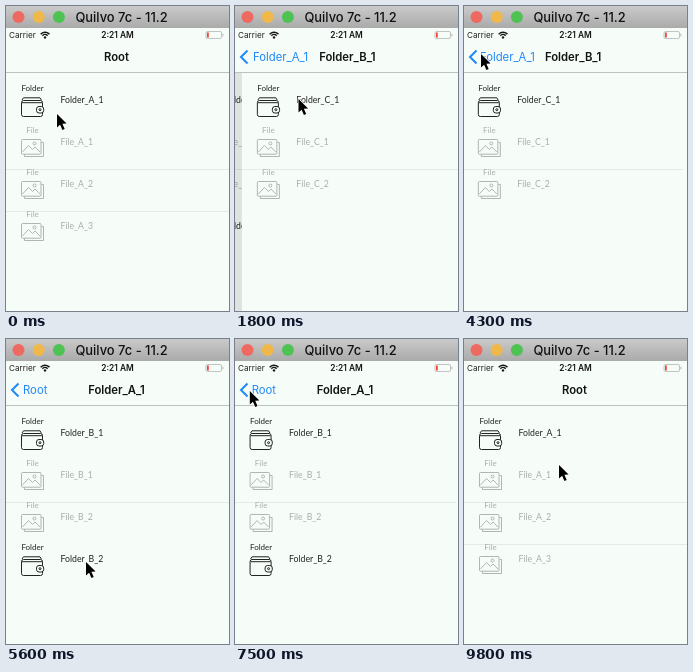
Write an HTML page with a canvas that moves like this. It is 223 px wide and 305 px high and loops after 9.9 s.

```html
<!DOCTYPE html>
<html lang="en">
<head>
<meta charset="utf-8">
<title>Folder navigation</title>
<style>
html, body { margin: 0; width: 100%; height: 100%; overflow: hidden; background: #f6fcf7; }
canvas { display: block; }
</style>
</head>
<body>
<canvas id="stage" width="223" height="305"></canvas>
<script>
const W = 223, H = 305, LOOP = 9900, NAV_BOTTOM = 67, CENTER = 110.5, PARALLAX = 67;
const BG = '#f6fcf7', BLUE = '#2089f7', DARK = '#202322', PALE = '#a9aeaa';
const UI = 'Inter, "Liberation Sans", sans-serif';
const LIST = 'Lato, "Open Sans", sans-serif';
const canvas = document.getElementById('stage');
const ctx = canvas.getContext('2d');
const scale = Math.max(1, window.devicePixelRatio || 1);
canvas.width = W * scale;
canvas.height = H * scale;
canvas.style.width = W + 'px';
canvas.style.height = H + 'px';

const pages = {
  root: { title: 'Root', rows: ['Folder_A_1', 'File_A_1', 'File_A_2', 'File_A_3'], lines: [163, 205] },
  a1: { title: 'Folder_A_1', back: 'Root', rows: ['Folder_B_1', 'File_B_1', 'File_B_2', 'Folder_B_2'], lines: [163] },
  b1: { title: 'Folder_B_1', back: 'Folder_A_1', rows: ['Folder_C_1', 'File_C_1', 'File_C_2'], lines: [163] },
  b2: { title: 'Folder_B_2', back: 'Folder_A_1', rows: [], lines: [] },
  c1: { title: 'Folder_C_1', back: 'Folder_B_1', rows: [], lines: [] }
};

// Each step: start time, lower page, upper page, pushed or popped
const steps = [
  [430, 'root', 'a1', true],
  [1445, 'a1', 'b1', true],
  [2930, 'b1', 'c1', true],
  [3900, 'b1', 'c1', false],
  [4720, 'a1', 'b1', false],
  [5930, 'a1', 'b2', true],
  [7020, 'a1', 'b2', false],
  [7900, 'root', 'a1', false]
];

// Pointer keys: time, x, y
const pointerKeys = [
  [0, 51, 108], [50, 51, 108], [200, 43, 99], [850, 43, 99], [1200, 63.5, 93],
  [2050, 63.5, 93], [2400, 12, 49], [2450, 12, 49], [2800, 76, 97],
  [3300, 76, 97], [3700, 17, 48], [5150, 17, 48], [5580, 80, 223],
  [6350, 80, 223], [6780, 16, 52], [7350, 16, 52], [7700, 13, 52],
  [8450, 13, 52], [8900, 44, 70], [9350, 72, 225], [9800, 95, 126], [LOOP, 95, 126]
];

function text(str, x, y, size, family, color, align = 'left', weight = 400) {
  ctx.font = `${weight} ${size}px ${family}`;
  ctx.fillStyle = color;
  ctx.textAlign = align;
  ctx.textBaseline = 'alphabetic';
  ctx.fillText(str, x, y);
}

function path(points, close) {
  ctx.beginPath();
  points.forEach(([x, y], i) => i ? ctx.lineTo(x, y) : ctx.moveTo(x, y));
  if (close) ctx.closePath();
}

function circle(x, y, r) {
  ctx.beginPath();
  ctx.arc(x, y, r, 0, Math.PI * 2);
}

function box(x, y, w, h, r) {
  ctx.beginPath();
  ctx.roundRect(x, y, w, h, r);
}

function at(x, y, draw) {
  ctx.save();
  ctx.translate(x, y);
  draw();
  ctx.restore();
}

function wallet() {
  ctx.strokeStyle = DARK;
  ctx.lineWidth = 1;
  box(0.5, 3.5, 21, 16, 2);
  ctx.stroke();
  path([[1, 3], [2.5, 0.8], [19, 0.8], [20.3, 3]]);
  ctx.stroke();
  path([[1, 5.7], [21, 5.7]]);
  ctx.stroke();
  box(15.5, 9.5, 7.2, 6.5, 2.5);
  ctx.fillStyle = BG;
  ctx.fill();
  ctx.stroke();
  circle(19, 12.7, 1);
  ctx.stroke();
}

function photos() {
  ctx.strokeStyle = PALE;
  ctx.lineWidth = 0.9;
  path([[20.5, 3.5], [22.5, 3.5], [22.5, 17.5], [3.5, 17.5], [3.5, 15.5]]);
  ctx.stroke();
  box(0.5, 0.5, 19.5, 14.7, 1);
  ctx.stroke();
  path([[1.5, 13], [7.5, 6.5], [11.5, 10.5], [14, 8], [19, 13]]);
  ctx.stroke();
  circle(13.5, 4.5, 1.5);
  ctx.stroke();
}

function drawPage(page, x, showLines = true) {
  at(x, 0, () => {
    ctx.fillStyle = BG;
    ctx.fillRect(0, NAV_BOTTOM, W + PARALLAX, H);
    if (showLines) {
      ctx.fillStyle = '#e4ebe5';
      page.lines.forEach(y => ctx.fillRect(0, y, W + PARALLAX, 1));
    }
    page.rows.forEach((name, i) => {
      const y = i * 41.9;
      const folder = name.startsWith('Folder');
      const color = folder ? DARK : PALE;
      text(folder ? 'Folder' : 'File', 26.5, 85 + y, 8, LIST, color, 'center');
      at(15, Math.round(91 + y), folder ? wallet : photos);
      text(name, 54.5, 97.3 + y, 8.7, LIST, color);
    });
  });
}

// Labels stay hidden until the bar is well on its way
const fade = share => Math.min(1, Math.max(0, share * 1.4 - 0.3));

function drawNav(lower, upper, q) {
  const title = (page, x) => text(page.title, x, 55.2, 11.3, UI, '#111413', 'center', 600);
  const back = (page, x) => page.back && text(page.back, x, 55.2, 11.3, UI, BLUE);
  ctx.globalAlpha = fade(1 - q);
  title(lower, CENTER - 83 * q);
  back(lower, 17 - 60 * q);
  ctx.globalAlpha = fade(q);
  title(upper, CENTER + 60 * (1 - q));
  back(upper, 17 + 35 * (1 - q));
  ctx.globalAlpha = lower.back ? 1 : fade(q);
  ctx.strokeStyle = BLUE;
  ctx.lineWidth = 2;
  path([[12.5, 44.5], [6, 51], [12.5, 57.5]]);
  ctx.stroke();
  ctx.globalAlpha = 1;
}

function drawStatus() {
  text('Carrier', 3, 32, 8.2, UI, '#222');
  ctx.strokeStyle = '#151515';
  ctx.lineWidth = 1.4;
  [5.8, 3.5].forEach(r => {
    ctx.beginPath();
    ctx.arc(39, 32, r, -Math.PI * 0.77, -Math.PI * 0.23);
    ctx.stroke();
  });
  ctx.fillStyle = '#151515';
  circle(39, 31.4, 1.2);
  ctx.fill();
  text('2:21 AM', 111.5, 32, 8.4, UI, '#151515', 'center', 600);
  ctx.strokeStyle = '#b3b8b4';
  ctx.lineWidth = 0.8;
  box(200, 25.5, 15.5, 7, 1.5);
  ctx.stroke();
  ctx.fillStyle = '#b3b8b4';
  ctx.fillRect(216.4, 27.7, 1, 2.6);
  ctx.fillStyle = '#f5453c';
  ctx.fillRect(201, 26.5, 1.8, 5);
}

function drawWindowBar() {
  const shade = ctx.createLinearGradient(0, 0, 0, 22);
  shade.addColorStop(0, '#c9cac9');
  shade.addColorStop(1, '#a9aaa9');
  ctx.fillStyle = shade;
  ctx.fillRect(0, 0, W, 22);
  ['#ee6a60', '#f0b849', '#4fc254'].forEach((color, i) => {
    circle(12.5 + i * 20.2, 11, 6);
    ctx.fillStyle = color;
    ctx.fill();
  });
  text('Quilvo 7c - 11.2', 115.5, 15.7, 12.9, UI, '#111', 'center', 500);
}

function pointerAt(t) {
  const i = pointerKeys.findIndex(key => key[0] > t);
  const [t0, x0, y0] = pointerKeys[i - 1];
  const [t1, x1, y1] = pointerKeys[i];
  const u = (t - t0) / (t1 - t0);
  const e = u * u * (3 - 2 * u);
  return [x0 + (x1 - x0) * e, y0 + (y1 - y0) * e];
}

function drawPointer() {
  path([[0, 0], [0, 13.5], [3.1, 10.7], [5.4, 16], [7.7, 15], [5.4, 9.8], [9.6, 9.6]], true);
  ctx.lineJoin = 'round';
  ctx.strokeStyle = '#fff';
  ctx.lineWidth = 1.6;
  ctx.stroke();
  ctx.fillStyle = '#000';
  ctx.fill();
}

// Critically damped spring: share of the distance still to go
function remaining(ms) {
  const k = ms * 0.015;
  const left = (1 + k) * Math.exp(-k);
  return left < 0.002 ? 0 : left;
}

function coverage(t) {
  const step = steps.filter(s => s[0] <= t).pop();
  if (!step) return [pages.root, pages.a1, 0];
  const [start, lower, upper, pushed] = step;
  const left = remaining(t - start);
  return [pages[lower], pages[upper], pushed ? 1 - left : left];
}

function render(t) {
  const [lower, upper, q] = coverage(t);
  ctx.setTransform(scale, 0, 0, scale, 0, 0);
  ctx.fillStyle = BG;
  ctx.fillRect(0, 0, W, H);
  if (q < 1) {
    drawPage(lower, -PARALLAX * q, lower !== pages.root || q === 0);
    ctx.fillStyle = `rgba(0, 0, 0, ${0.1 * q})`;
    ctx.fillRect(0, NAV_BOTTOM, W, H);
  }
  if (q > 0) drawPage(upper, W * (1 - q));
  ctx.fillStyle = BG;
  ctx.fillRect(0, 0, W, NAV_BOTTOM);
  ctx.fillStyle = '#bcc2bd';
  ctx.fillRect(0, 66, W, 1);
  drawNav(lower, upper, q);
  drawStatus();
  drawWindowBar();
  at(...pointerAt(t), drawPointer);
}

const began = performance.now();
function tick() {
  const t = (performance.now() - began) % LOOP;
  render(Math.floor(t / 100) * 100);
  requestAnimationFrame(tick);
}
tick();
</script>
</body>
</html>
```
